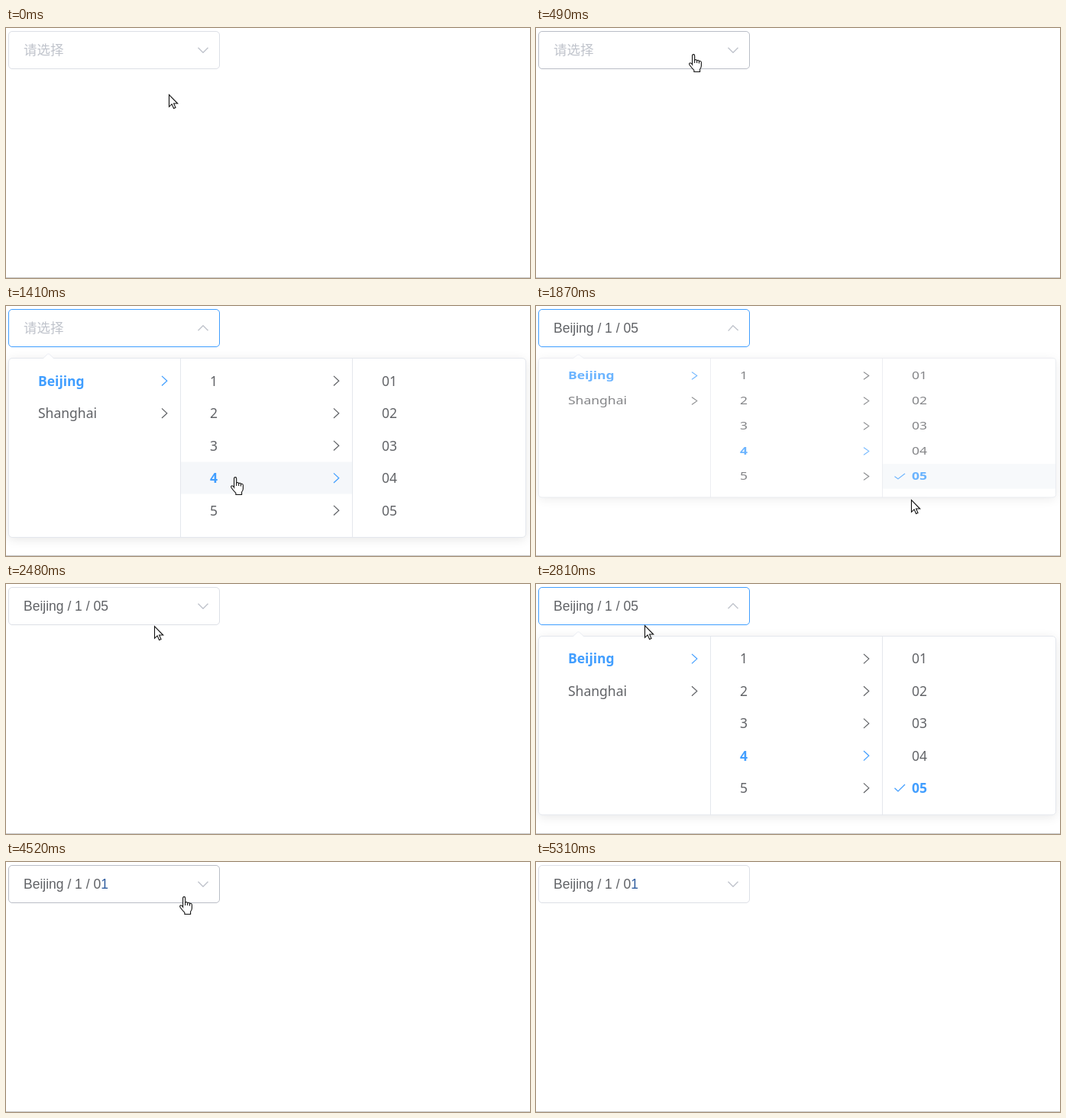
Recreate the animation shown at these times as an HTML page with a canvas. Size 686x328 px, loop 5.62 s.

```html
<!DOCTYPE html>
<html lang="zh">
<head>
<meta charset="utf-8">
<title>Cascader</title>
<style>
html, body { margin: 0; width: 100%; height: 100%; overflow: hidden; background: #fff; }
canvas { display: block; }
</style>
</head>
<body>
<canvas id="stage" width="686" height="328"></canvas>
<script>
const ctx = document.getElementById('stage').getContext('2d');
const LOOP = 5620, STEP = 50, PHASE = 10, ZOOM = 300;
const BLUE = '#409eff', TEXT = '#606266', PALE = '#c0c4cc', LINE = '#e4e7ed';
const MENU_FONT = '17.5px "Noto Sans", "Open Sans", sans-serif';
const INPUT_FONT = '17.5px "Liberation Sans", Arial, sans-serif';
const HINT_FONT = '17.5px "Noto Sans CJK SC", "Noto Sans CJK", sans-serif';
const TOP = 68, BOTTOM = 303.5, COL = 225, ROW = 42.5, FIRST = 77;
const DIGITS = ['1', '2', '3', '4', '5'];
const MENUS = [['Beijing', 'Shanghai'], DIGITS, DIGITS.map(d => '0' + d)];

// Each pointer move ends in a click; the menu state follows from the clicks.
const move = (from, to, x, y, click = to) => ({ from, to, x, y, click });
const HOME = { x: 213, y: 87 };
const MOVES = [
  move(30, 475, 205, 34),
  move(590, 760, 155, 100),
  move(1000, 1270, 286, 222),
  move(1330, 1844, 491, 254),
  move(1900, 2585, 165, 36),
  move(2600, 2810, 142, 54),
  move(2810, 2965, 110, 138),
  move(3170, 3330, 273, 155),
  move(3550, 3700, 548, 109, 4115),
  move(4130, 4465, 232, 45, Infinity),
  move(4880, 4985, 192, 38, Infinity),
  move(4985, 5310, 545, 335)
];

const ARROW = new Path2D('M.5.5V16.3L4.1 12.9L6.6 18.5L9 17.4L6.6 12H11.7Z');
const HAND = new Path2D('M4.6 14V2.4Q4.6.6 6.1.6Q7.7.6 7.7 2.4V8Q9.4 6.7 10.7 8.6Q12.5 7.5 13.5 9.4' +
  'Q16.4 8.8 16.4 11.4V15.5Q16.4 18 14.6 20V23.5H6.9V21.4Q3.5 18 1.1 14.5Q-.1 12 2 11.7Q3.4 11.7 4.6 14Z');
const KNUCKLES = new Path2D('M7.7 8V12M10.7 8.6V12M13.5 9.4V12.5');

const clamp = p => Math.max(0, Math.min(1, p));
const smooth = p => p * p * (3 - 2 * p);

// cubic-bezier(.23, 1, .32, 1)
function easeOut(x) {
  if (x >= 1) return 1;
  let lo = 0, hi = 1;
  for (let i = 0; i < 20; i++) {
    const m = (lo + hi) / 2, n = 1 - m;
    if (0.69 * m * n * n + 0.96 * m * m * n + m * m * m < x) lo = m; else hi = m;
  }
  return 1 - (1 - lo) ** 3;
}

function pointerAt(t) {
  let { x, y } = HOME;
  for (const m of MOVES) {
    const p = smooth(clamp((t - m.from) / (m.to - m.from)));
    x += (m.x - x) * p;
    y += (m.y - y) * p;
  }
  return { x, y };
}

const inInput = p => p.x > 3 && p.x < 280 && p.y > 4 && p.y < 53.5;

function rowAt(x, y, cols) {
  const c = Math.floor((x - 4) / COL), r = Math.floor((y - FIRST) / ROW);
  return c >= 0 && c < cols && r >= 0 && r < MENUS[c].length ? { c, r } : null;
}

function stateAt(t) {
  const s = { path: [], leaf: -1, value: '', shown: false, since: -ZOOM };
  const toggle = time => { s.shown = !s.shown; s.since = time; };
  for (const m of MOVES.filter(m => m.click <= t)) {
    const hit = s.shown && rowAt(m.x, m.y, s.path.length + 1);
    if (inInput(m)) {
      toggle(m.click);
    } else if (hit && hit.c < 2) {
      s.path = [...s.path.slice(0, hit.c), hit.r];
      s.leaf = -1;
    } else if (hit) {
      s.leaf = hit.r;
      s.value = 'Beijing / 1 / ' + MENUS[2][hit.r];
      toggle(m.click);
    }
  }
  return s;
}

function polyline(color, width, points) {
  ctx.strokeStyle = color;
  ctx.lineWidth = width;
  ctx.beginPath();
  points.forEach(p => ctx.lineTo(p[0], p[1]));
  ctx.stroke();
}

function label(str, x, y, font, color) {
  ctx.font = font;
  ctx.fillStyle = color;
  ctx.fillText(str, x, y);
}

function roundBox(x, y, w, h, r) {
  ctx.beginPath();
  ctx.roundRect(x, y, w, h, r);
}

function drawInput(value, turn, border) {
  roundBox(3.5, 4.5, 276, 49, 4.5);
  ctx.strokeStyle = border;
  ctx.lineWidth = 1;
  ctx.stroke();
  if (value) {
    const head = value.slice(0, -1), last = value.slice(-1);
    label(head, 23, 35, INPUT_FONT, TEXT);
    label(last, 23 + ctx.measureText(head).width, 35, INPUT_FONT, last === '1' ? '#2f5c9e' : TEXT);
  } else {
    label('请选择', 23, 35, HINT_FONT, PALE);
  }
  ctx.save();
  ctx.translate(258, 29);
  ctx.rotate(Math.PI * turn);
  polyline(PALE, 1.4, [[-6.5, -3.3], [0, 3.2], [6.5, -3.3]]);
  ctx.restore();
}

function drawRow(col, row, { active, checked, hovered, last }) {
  const left = 4 + col * COL, top = FIRST + row * ROW, mid = top + 21.2;
  const on = active || checked, color = on ? BLUE : TEXT;
  if (hovered) {
    ctx.fillStyle = '#f5f7fa';
    ctx.fillRect(left, top, COL + (last ? 1 : -1), 42);
  }
  label(MENUS[col][row], left + 38, mid + 6.3, (on ? 'bold ' : '') + MENU_FONT, color);
  if (col < 2) {
    const x = left + 200 + (last ? 1 : 0);
    polyline(color, 1.2, [[x, mid - 6.3], [x + 6.8, mid], [x, mid + 6.3]]);
  }
  if (checked) polyline(BLUE, 1.3, [[469.5, mid], [474, mid + 4.3], [483, mid - 4.7]]);
}

function drawPanel(path, leaf, open, hover) {
  const cols = path.length + 1;
  ctx.save();
  ctx.translate(0, TOP);
  ctx.scale(1, open);
  ctx.translate(0, -TOP);

  roundBox(3.5, TOP + 0.5, cols * COL + 2, BOTTOM - TOP - 0.5, 4.5);
  ctx.fillStyle = '#fff';
  ctx.shadowColor = `rgba(0,0,0,${0.1 * open})`;
  ctx.shadowBlur = 14;
  ctx.shadowOffsetY = 2.5;
  ctx.fill();
  ctx.shadowColor = 'transparent';

  ctx.globalAlpha = open;
  ctx.strokeStyle = LINE;
  ctx.lineWidth = 1;
  ctx.stroke();

  ctx.beginPath();
  ctx.moveTo(48.5, 69.2);
  ctx.lineTo(55.5, 62.7);
  ctx.lineTo(62.5, 69.2);
  ctx.fill();
  polyline('#ebeef5', 1, [[48.5, 68.5], [54.5, 63], [56.5, 63], [62.5, 68.5]]);

  for (let c = 0; c < cols; c++) {
    if (c) polyline(LINE, 1, [[3.5 + c * COL, TOP + 1], [3.5 + c * COL, BOTTOM]]);
    MENUS[c].forEach((_, r) => drawRow(c, r, {
      active: path[c] === r,
      checked: c === 2 && leaf === r,
      hovered: hover && hover.c === c && hover.r === r,
      last: c === cols - 1
    }));
  }
  ctx.restore();
}

function drawPointer(p, hand) {
  const shape = hand ? HAND : ARROW;
  ctx.save();
  ctx.translate(Math.round(p.x) - (hand ? 5 : 0), Math.round(p.y));
  ctx.fillStyle = '#fff';
  ctx.strokeStyle = '#111';
  ctx.lineWidth = 1.1;
  ctx.fill(shape);
  ctx.stroke(shape);
  if (hand) ctx.stroke(KNUCKLES);
  ctx.restore();
}

function draw(time) {
  const t = Math.max(0, Math.floor((time - PHASE) / STEP) * STEP + PHASE);
  const { path, leaf, value, shown, since } = stateAt(t);
  const x = clamp((t - since) / ZOOM);
  const mix = v => shown ? v : 1 - v;
  const open = mix(easeOut(x)), turn = mix(smooth(clamp(x * 1.4)));
  const p = pointerAt(t), cols = path.length + 1;
  const visible = open > 0.01;
  const overRow = visible && rowAt(p.x, TOP + (p.y - TOP) / open, cols);

  ctx.fillStyle = '#fff';
  ctx.fillRect(0, 0, 686, 328);
  ctx.fillStyle = '#c8c8c8';
  ctx.fillRect(0, 327, 686, 1);

  drawInput(value, turn, open > 0.3 ? BLUE : inInput(p) ? '#b9bdc6' : '#dcdfe6');
  if (visible) drawPanel(path, leaf, open, rowAt(p.x, p.y, cols));
  drawPointer(p, inInput(p) || overRow);
}

const start = performance.now();
function tick() {
  draw((performance.now() - start) % LOOP);
  requestAnimationFrame(tick);
}
tick();
</script>
</body>
</html>
```
